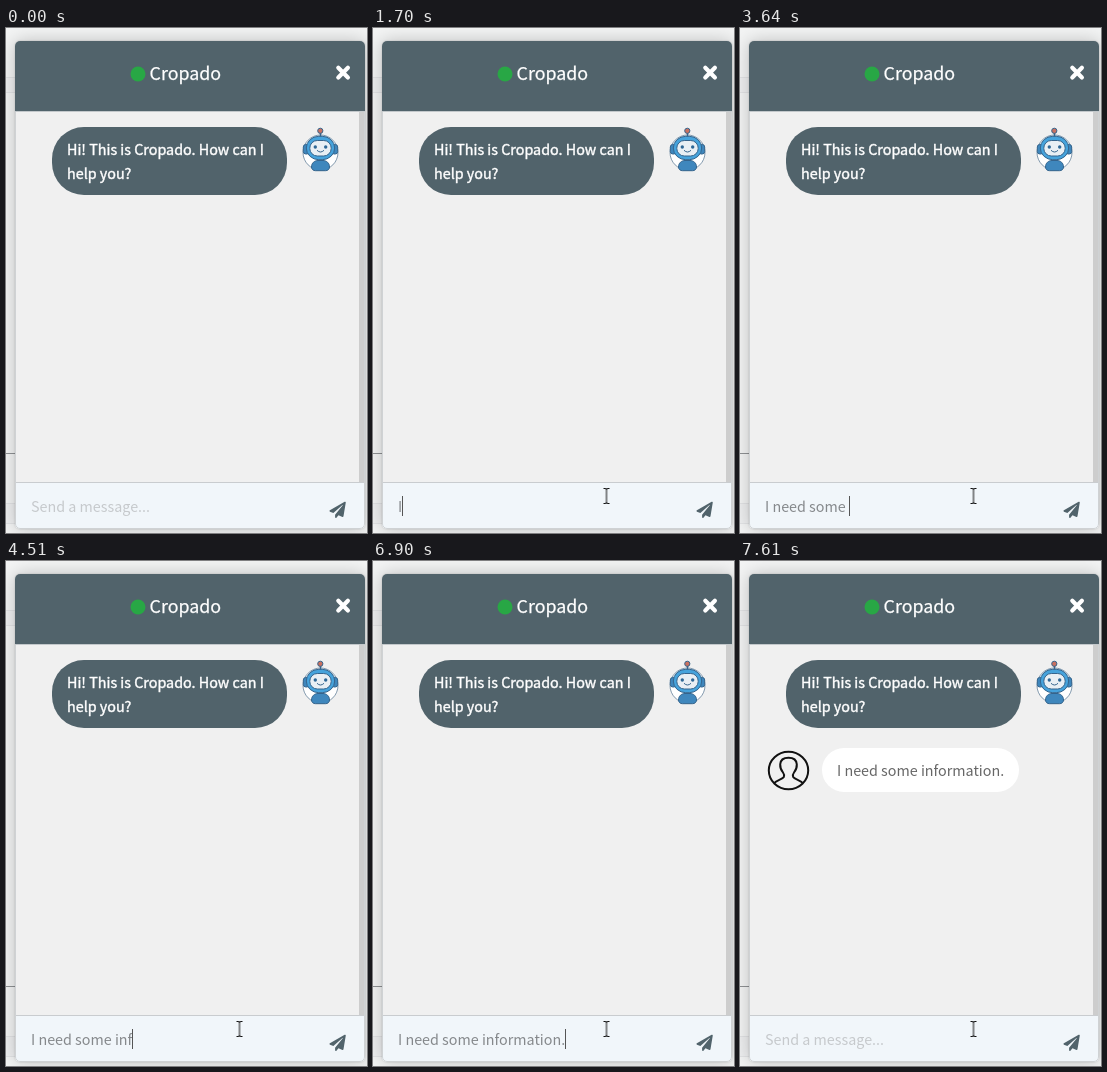
These frames come from a looping animation (361 by 505 pixels, 8000 ms). An HTML page:

```html
<!DOCTYPE html>
<html lang="en">
<head>
<meta charset="utf-8">
<title>Chat window</title>
<style>
  :root { --slate: #51636b; }
  html, body { margin: 0; width: 100%; height: 100%; overflow: hidden; background: #f3f4f4; }
  #stage { position: relative; width: 361px; height: 505px; overflow: hidden; }
  .gap { position: absolute; left: 0; width: 9px; background: #eeeff0; border: solid #e2e3e5; border-width: 1px 0; }
  .rule { position: absolute; left: 0; top: 425px; width: 9px; height: 1px; background: #8f9294; }
  #panel {
    position: absolute; left: 9px; top: 13px; width: 350px; height: 488px;
    border-radius: 5px; background: #f0f0f0;
    box-shadow: 0 0 18px rgba(0, 0, 0, .22), 0 0 2px rgba(0, 0, 0, .18);
  }
  svg { position: absolute; left: 0; top: 0; }
  text {
    font: 400 14.34px "Noto Sans CJK JP", "Noto Sans CJK SC", "Noto Sans CJK KR", "Noto Sans CJK", "Open Sans", sans-serif;
    white-space: pre;
  }
  .light { fill: #fff; stroke: #fff; stroke-width: .4px; }
  .title { font-size: 17.86px; stroke-width: .25px; }
  .slate { fill: var(--slate); }

  #pointer { animation: glide 8s linear infinite; }
  #click { animation: press 8s step-end infinite; }
  #reply { animation: appear 8s linear infinite; }
  @keyframes glide {
    0% { transform: translate(210.5px, 515px); }
    .8% { transform: translate(210.5px, 511px); }
    4.75%, 6.5% { transform: translate(207.5px, 495px); }
    7.625%, 10.5% { transform: translate(207.5px, 480px); animation-timing-function: ease-out; }
    13.5%, 100% { transform: translate(233.5px, 468px); }
  }
  @keyframes press {
    0%, 10.6% { visibility: hidden; }
    7.625% { visibility: visible; }
  }
  @keyframes appear {
    0%, 92% { opacity: 0; }
    94.1%, 100% { opacity: 1; }
  }
</style>
</head>
<body>
<div id="stage">
  <div class="gap" style="top:49px;height:14px"></div>
  <div class="rule"></div>
  <div class="gap" style="top:475px;height:19px"></div>
  <div id="panel"></div>

  <svg width="361" height="505" viewBox="0 0 361 505">
    <!-- header -->
    <path class="slate" d="M9 83V18a5 5 0 0 1 5-5H354a5 5 0 0 1 5 5V83z"/>
    <path d="M9 83.5H359" stroke="#c3c8cb"/>
    <circle cx="132" cy="46" r="7.5" fill="#28a745"/>
    <text class="light title" x="143.5" y="52">Cropado</text>
    <path d="M332.3 39.8l9.6 9.6m0-9.6l-9.6 9.6" stroke="#fff" stroke-width="4.2" stroke-linecap="round"/>

    <!-- scrollbar -->
    <rect x="353" y="84" width="5" height="370" fill="#cdcdcd"/>

    <!-- greeting -->
    <rect class="slate" x="46" y="99" width="235" height="68" rx="32"/>
    <text class="light" x="61" y="127">Hi! This is Cropado. How can I</text>
    <text class="light" x="61" y="151">help you?</text>

    <!-- robot -->
    <g stroke="#35648c" stroke-width="1">
      <circle cx="314.5" cy="124.5" r="17.5" fill="#fff" stroke="#8299ad"/>
      <path d="M314.5 105v5" stroke-width="1.5"/>
      <circle cx="314.3" cy="102.8" r="2.6" fill="#c9705f"/>
      <path d="M305.5 139c0-4 3-6.500 6.500-6.500h5c3.500 0 6.500 2.500 6.500 6.500c0 2.500-2 3.700-4 3.700h-10c-2 0-4-1.200-4-3.700z" fill="#3f87bd"/>
      <rect x="297.300" y="116.500" width="6" height="9.500" rx="2.500" fill="#3f87bd"/>
      <rect x="325.700" y="116.500" width="6" height="9.500" rx="2.500" fill="#3f87bd"/>
      <rect x="300.300" y="108.300" width="28.400" height="23.400" rx="12.500" ry="11.700" fill="#46a3dc"/>
      <rect x="303.800" y="112.500" width="21.400" height="15.500" rx="7.500" fill="#e9eff4"/>
      <path d="M311 122.300q3.500 3.400 7 0" fill="none"/>
    </g>
    <g fill="#2f6795">
      <circle cx="309.300" cy="119" r="1.700"/>
      <circle cx="319.700" cy="119" r="1.700"/>
    </g>

    <!-- reply -->
    <g id="reply">
      <rect x="82" y="187" width="197" height="44" rx="22" fill="#fff"/>
      <text x="97" y="215" fill="#666">I need some information.</text>
      <g fill="none" stroke="#111" stroke-width="2" stroke-linejoin="round">
        <ellipse cx="48.500" cy="209.500" rx="19.700" ry="18.700"/>
        <path d="M34 222.300c2-3 8.500-3.800 9.800-6.300c.7-1.600.2-3.200-.8-4.500c-2-2.600-3-5.500-2.800-8.300c.3-4.200 3.700-6.500 8.300-6.500s8 2.300 8.300 6.500c.2 2.800-.8 5.700-2.800 8.300c-1 1.300-1.500 2.900-.8 4.500c1.300 2.500 7.800 3.300 9.800 6.300"/>
      </g>
    </g>

    <!-- input bar -->
    <path d="M9 455H359V496a5 5 0 0 1-5 5H14a5 5 0 0 1-5-5z" fill="#f1f6fa"/>
    <path d="M9 454.500H359" stroke="#c9cccf"/>
    <path d="M9.500 84V496a4.500 4.500 0 0 0 4.500 4.500H354a4.500 4.500 0 0 0 4.500-4.500V84" fill="none" stroke="#cfd2d4"/>
    <path class="slate" transform="translate(323.500 473.700) scale(.0318)"
      d="M476 3L12 271c-18 10-16 35 2 43l107 44L408 105c6-5 14 3 9 9L176 407v80c0 24 28 33 42 16l64-77 125 52c14 6 30-3 33-18l72-432c3-20-19-35-36-25z"/>
    <circle id="click" cx="205.500" cy="479" r="12" fill="#faf97c"/>
    <text id="hint" x="25" y="484" fill="#c6c9cc">Send a message...</text>
    <text id="typed" x="25" y="484" fill="#85888b"></text>
    <rect id="caret" y="468" width="1" height="20" fill="#555"/>
    <path id="pointer" d="M-3 -7.500h2q1 0 1 1q0-1 1-1h2M0-7V7M-3 7.500h2q1 0 1-1q0 1 1 1h2" fill="none" stroke="#111"/>
  </svg>
</div>

<script>
  const LOOP = 8000, LEFT = 25, FOCUS = 680, SENT = 7070;
  const KEY = 75;     // ms between keys within a burst
  const BLINK = 540;  // ms the caret stays on or off

  const bursts = [
    [1700, "I"], [2025, " ne"], [2720, "ed "], [3180, "so"], [3490, "me "],
    [4190, "in"], [4510, "for"], [4890, "ma"], [5200, "tion"], [6900, "."]
  ];
  const keys = bursts.flatMap(([time, text]) =>
    [...text].map((char, i) => ({ char, time: time + i * KEY })));

  const [hint, typed, caret] = ["hint", "typed", "caret"].map(id => document.getElementById(id));
  const show = (node, on) => node.setAttribute("visibility", on ? "visible" : "hidden");

  const pen = document.createElement("canvas").getContext("2d");
  const style = getComputedStyle(typed);
  pen.font = `${style.fontWeight} ${style.fontSize} ${style.fontFamily}`;

  function render(t) {
    const hit = keys.filter(key => key.time <= t);
    const text = t < SENT ? hit.map(key => key.char).join("") : "";
    const last = t >= SENT ? SENT : hit.length ? hit[hit.length - 1].time : FOCUS;

    typed.textContent = text;
    show(hint, !text);
    caret.setAttribute("x", Math.round(LEFT + pen.measureText(text).width));
    // the blink restarts with every key
    show(caret, t >= FOCUS && Math.floor((t - last) / BLINK) % 2 === 0);
  }

  let start;
  function frame(now) {
    start ??= now;
    render((now - start) % LOOP);
    requestAnimationFrame(frame);
  }
  render(0);
  requestAnimationFrame(frame);
</script>
</body>
</html>
```
